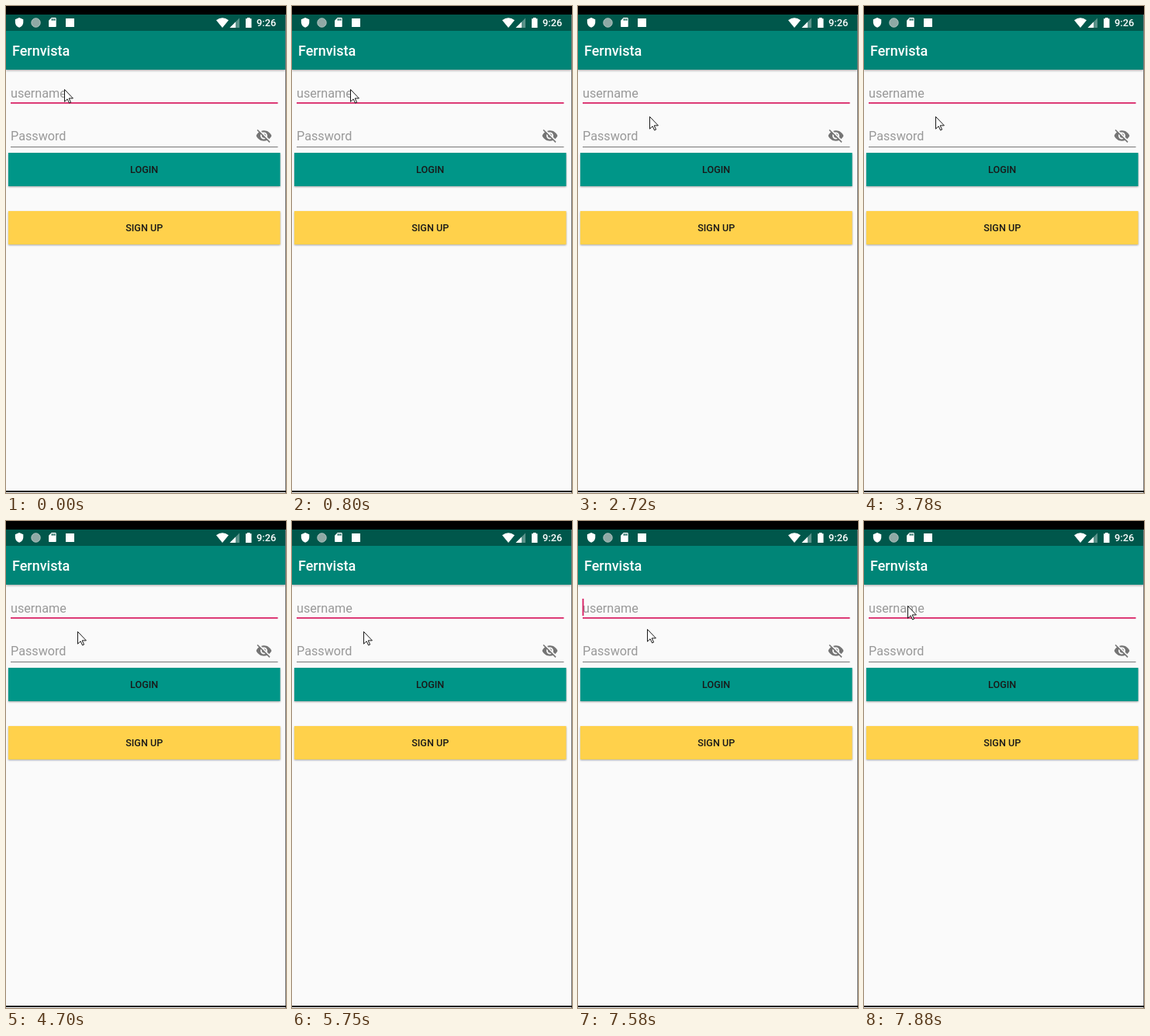
An HTML page for the animation above (8000 ms loop, 361 by 627 pixels).

```html
<!DOCTYPE html>
<html lang="en">
<head>
<meta charset="utf-8">
<title>Login screen</title>
<style>
  html, body { margin: 0; width: 100%; height: 100%; overflow: hidden; background: #fafafa; }
  svg { display: block; width: 100%; height: 100%; font-family: Roboto, sans-serif; }
  .bar { filter: drop-shadow(0 1.5px 1.8px rgba(0, 0, 0, .36)); }
  .button { filter: drop-shadow(0 1px 1px rgba(0, 0, 0, .34)); }
  .strong { font-weight: 500; }
  .title { font-size: 18px; fill: #fff; }
  .hint { font-size: 16.2px; fill: #999; }
  .label { font-size: 12.6px; fill: #191919; text-anchor: middle; }
  .clock { font-size: 12.8px; fill: #fff; }
</style>
</head>
<body>
<svg viewBox="0 0 361 627">
  <rect width="361" height="627" fill="#fafafa"/>

  <rect class="bar" y="32" width="360" height="50" fill="#008577"/>
  <rect y="11" width="360" height="21" fill="#00574b"/>
  <rect width="361" height="11"/>
  <text class="title strong" x="8" y="64">Fernvista</text>

  <g fill="#fff">
    <path transform="translate(10.1 14.4) scale(.58)" d="M12 1L3 5v6c0 5.55 3.84 10.74 9 12 5.16-1.26 9-6.45 9-12V5z"/>
    <circle cx="38.5" cy="21.5" r="5.7" fill="#8fa9a5" stroke="#b3c5c2"/>
    <path transform="translate(52.7 13.9) scale(.6)" fill-rule="evenodd" d="M18 2h-8L4 8v12q0 2 2 2h12q2 0 2-2V4q0-2-2-2zM12 8h-2V4h2zM15 8h-2V4h2zM18 8h-2V4h2z"/>
    <rect x="77" y="16" width="11" height="11"/>
    <path d="M279 28L271 18.2Q279 12.4 287 18.2z"/>
    <path d="M301 15.5V28H288.5z" opacity=".35"/>
    <path d="M296 20.5V28H288.5z"/>
    <path d="M311 15h3.5v1.3h2V28h-7.5V16.3h2z"/>
  </g>
  <text class="clock strong" x="323" y="26">9:26</text>

  <text class="hint" x="6" y="117.5">username</text>
  <rect x="6" y="124" width="344.5" height="1.7" fill="#d81b60"/>
  <text class="hint" x="6" y="172.5">Password</text>
  <rect x="6" y="181" width="344.5" height="1" fill="#777"/>
  <path transform="translate(321.7 156.2) scale(.9)" fill="#757575" d="M12 7c2.76 0 5 2.24 5 5 0 .65-.13 1.26-.36 1.83l2.92 2.92c1.51-1.26 2.7-2.89 3.43-4.75-1.73-4.39-6-7.5-11-7.5-1.4 0-2.74.25-3.98.7l2.16 2.16C10.74 7.13 11.35 7 12 7zM2 4.27l2.74 2.74C3.08 8.3 1.78 10.02 1 12c1.73 4.39 6 7.5 11 7.5 1.55 0 3.03-.3 4.38-.84L19.73 22 21 20.73 3.27 3zM7.53 9.8l1.55 1.55C9 11.56 9 11.78 9 12c0 1.66 1.34 3 3 3 .22 0 .44-.03.65-.08l1.55 1.55c-.67.33-1.41.53-2.2.53-2.76 0-5-2.24-5-5 0-.79.2-1.53.53-2.2zM11.84 9.02l3.15 3.15.02-.16c0-1.66-1.34-3-3-3z"/>

  <rect class="button" x="3" y="189" width="350.5" height="43" fill="#009688"/>
  <text class="label strong" x="178.2" y="215.2">LOGIN</text>
  <rect class="button" x="3" y="264" width="350.5" height="43" fill="#ffd14b"/>
  <text class="label strong" x="178.2" y="290.2">SIGN UP</text>

  <rect x="360" y="11" width="1" height="616" fill="#777"/>
  <rect y="624" width="361" height="2"/>

  <rect id="caret" x="5.6" y="100" width="1.8" height="22" fill="#d81b60"/>
  <path id="pointer" d="M.5.5V16.2L4.1 12.8 6.6 18 8.6 17.1 6.2 11.9H11.4z" fill="#fff" stroke="#000" stroke-width=".9"/>
</svg>
<script>
  const LOOP = 8000;
  const caret = document.getElementById('caret');
  const pointer = document.getElementById('pointer');

  // The caret toggles at each time, starting hidden.
  const blinks = [280, 800, 1200, 1760, 2290, 2720, 3220, 3780, 4300,
                  4700, 5220, 5750, 6300, 6740, 7300, 7730];

  // Pointer stops: time, x, y
  const stops = [
    [0, 75, 107],
    [2290, 84, 125],
    [2410, 92, 142],
    [7580, 89, 139],
    [7730, 68, 121],
    [7880, 56, 109]
  ];

  const start = performance.now();

  function draw() {
    const t = (performance.now() - start) % LOOP;
    const shown = blinks.filter(b => b <= t).length % 2;
    const [, x, y] = stops.filter(s => s[0] <= t).pop();
    caret.setAttribute('opacity', shown);
    pointer.setAttribute('transform', `translate(${x} ${y})`);
    requestAnimationFrame(draw);
  }
  draw();
</script>
</body>
</html>
```
